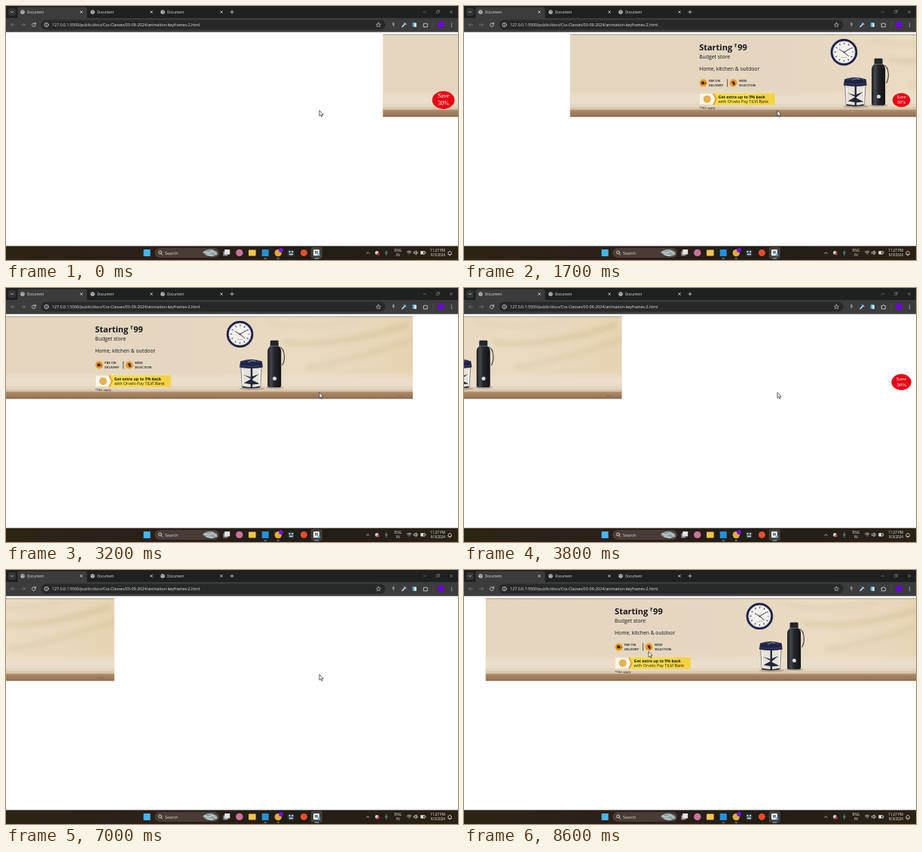
An HTML page that plays this animation: 600 px wide and 338 px high, repeating every 8700 ms.

```html
<!DOCTYPE html>
<html lang="en">
<head>
<meta charset="utf-8">
<title>Document</title>
<style>
  html, body { margin: 0; width: 100%; height: 100%; overflow: hidden; background: #fff; }
  svg { display: block; width: 600px; height: 338px; font-family: "Open Sans", "Noto Sans", sans-serif; }
  .line { fill: none; stroke-linecap: round; stroke-linejoin: round; }
  .bold { font-weight: 700; }
  .serif { font-family: "Liberation Serif", "Noto Serif", serif; }
</style>
</head>
<body>
<svg viewBox="0 0 600 338">
  <defs>
    <linearGradient id="wall">
      <stop offset="0" stop-color="#e3d5be"/><stop offset=".5" stop-color="#e4d6c0"/>
      <stop offset=".75" stop-color="#eadcc2"/><stop offset="1" stop-color="#e6d3b3"/>
    </linearGradient>
    <linearGradient id="shelf" x2="0" y2="1">
      <stop offset="0" stop-color="#eee3d0" stop-opacity="0"/><stop offset=".45" stop-color="#ebdfcb"/>
      <stop offset=".8" stop-color="#e8dcc8"/><stop offset="1" stop-color="#cdb799"/>
    </linearGradient>
    <linearGradient id="edge" x2="0" y2="1">
      <stop offset="0" stop-color="#b3967a"/><stop offset=".3" stop-color="#a38260"/><stop offset="1" stop-color="#967355"/>
    </linearGradient>
    <linearGradient id="steel">
      <stop offset="0" stop-color="#17181b"/><stop offset=".25" stop-color="#46484d"/>
      <stop offset=".5" stop-color="#232529"/><stop offset="1" stop-color="#111215"/>
    </linearGradient>
    <linearGradient id="taskbar">
      <stop offset="0" stop-color="#2a2414"/><stop offset=".4" stop-color="#2b1f1a"/>
      <stop offset=".65" stop-color="#211d17"/><stop offset="1" stop-color="#2a2214"/>
    </linearGradient>
    <filter id="blur"><feGaussianBlur stdDeviation="3"/></filter>
    <clipPath id="frame"><rect width="593.5" height="110"/></clipPath>
    <g id="globe">
      <circle r="2.7" fill="#c9cbcd"/>
      <path d="M-1.8-.9h1.9l.9 1-1.3 1.6M1-2l1 1.1" class="line" stroke="#46484b" stroke-width=".8"/>
    </g>
    <path id="cross" d="M-1.4-1.4 1.4 1.4M1.4-1.4-1.4 1.4" class="line" stroke-width=".75"/>
  </defs>

  <rect width="600" height="338" fill="#fefefe"/>

  <g id="banner">
    <g clip-path="url(#frame)">
      <rect width="593.5" height="110" fill="url(#wall)"/>
      <g filter="url(#blur)" class="line" stroke="#c9ad82" opacity=".4">
        <path d="M425 34Q490 42 585 12" stroke-width="5"/>
        <path d="M455 68Q520 58 600 28" stroke-width="6" opacity=".6"/>
        <path d="M400 8Q460 20 520 4" stroke-width="4" opacity=".5"/>
      </g>
      <rect y="74" width="593.5" height="27" fill="url(#shelf)"/>
      <path d="M0 94.5h593.5M0 97.5h593.5" stroke="#d6c4aa" stroke-width=".7"/>
      <rect y="100.5" width="593.5" height="9.5" fill="url(#edge)"/>
      <path d="M0 .4h593.5" stroke="#84735c" stroke-width=".9"/>
      <path d="M0 109.6h593.5" stroke="#664c36" stroke-width=".9"/>
      <text x="571" y="107.6" font-size="3" fill="#755a43">*terms</text>
    </g>

    <g fill="#15161a">
      <text x="171.5" y="21.5" font-size="11" class="bold">Starting</text>
      <text x="218.2" y="17" font-size="6.5" class="bold">₹</text>
      <text x="222.5" y="21.5" font-size="11" class="bold">99</text>
      <text x="171.5" y="32" font-size="6.85">Budget store</text>
      <text x="171.5" y="48" font-size="6.8">Home, kitchen &amp; outdoor</text>
      <g font-size="4.2" font-weight="600">
        <text x="184.3" y="63.7">PAY ON</text><text x="184.3" y="69.2">DELIVERY</text>
        <text x="224.3" y="63.7">WIDE</text><text x="224.3" y="69.2">SELECTION</text>
      </g>
      <path d="M209 60v10" stroke="#37332e" stroke-width=".8"/>
      <text x="171.8" y="99.4" font-size="4">*T&amp;C apply</text>
    </g>
    <g fill="#ee981f">
      <circle cx="177" cy="65" r="5"/><circle cx="217" cy="65" r="5"/>
    </g>
    <path d="M174.5 63h4v3.8h-4zm5 1.2 1.3 1.3-1.3 1.3M214.8 63.2l3-1 1.8 4.5-2.5 1.3z" fill="#3b2a20"/>

    <g transform="translate(171.8 78.8)">
      <path d="M0 0h100.2v15.3H0z" fill="#f7dc4b"/>
      <path d="M78 0h22.2v15.3H66z" fill="#f4ce3c" opacity=".6"/>
      <path d="M0 0h19.5l4 7.5-4 7.8H0z" fill="#f0a22c"/>
      <path d="M0 0h17.5l3.5 7.5-3.5 7.8H0z" fill="#f8f5ef"/>
      <circle cx="10.3" cy="7.6" r="5" fill="#e5b24e"/>
      <text x="25.2" y="6.6" font-size="5.25" class="bold" fill="#1b1a17">Get extra up to 5% back</text>
      <text x="25.2" y="13" font-size="5.4" fill="#1b1a17">with Orvelo Pay TILVI Bank</text>
    </g>

    <g transform="translate(363.8 24)">
      <circle r="16.3" fill="#f2f1ed" stroke="#202348" stroke-width="3"/>
      <circle r="14.6" fill="none" stroke="#b4b5c3" stroke-width=".5"/>
      <circle r="11.6" fill="none" stroke="#383946" stroke-width="2.4" stroke-dasharray="1 5.074" stroke-dashoffset=".5"/>
      <path d="M0 0-6-3.6M0 0l8.5-5M0 0l6 5" class="line" stroke="#24242c" stroke-width=".9"/>
      <circle r="1" fill="#24242c"/>
      <text y="7" font-size="2.4" text-anchor="middle" fill="#555">quartz</text>
    </g>

    <ellipse cx="380" cy="96.2" rx="17" ry="2" fill="#8f7a61" opacity=".5"/>
    <ellipse cx="410" cy="95" rx="12" ry="1.6" fill="#8f7a61" opacity=".5"/>

    <path d="M365 68h27.5l-1.6 26q-12 3-24.2 0z" fill="#e7e2da" fill-opacity=".9" stroke="#6e7079" stroke-width=".8"/>
    <path d="M378 69h2.4v26H378z" fill="#26283a"/>
    <path d="m368 78 10 3 11-4-9 7zM369 89l9-5 12 6-10 1zM367 93q12 3 23 0v2q-12 2-23 0z" fill="#24273a"/>
    <path d="M367.5 72v20M390 72v20" class="line" stroke="#fff" stroke-width="1"/>
    <path d="M364.5 60q14-5 28.5 0l1.2 8q-15 3-31 0z" fill="#202444"/>
    <path d="M367 60.8q12-3 23 0M364.5 66q14 2 28 0" class="line" stroke="#4b507a" stroke-width=".7"/>
    <path d="m375 61 5-2 4 1" class="line" stroke="#a8abc0" stroke-width=".8"/>

    <path d="M416 41q6 1 6.7 12 .2 7-2.5 12" class="line" stroke="#34353a" stroke-width="1.1"/>
    <rect x="404" y="32.3" width="11" height="8" rx="1.3" fill="#24262a"/>
    <path d="M403.8 40h11.4q3.3 3 3.3 6.5V92q0 2.7-2.7 2.7h-12.6q-2.7 0-2.7-2.7V46.5q0-3.5 3.3-6.5z" fill="url(#steel)"/>
    <path d="M404 39.8h11" stroke="#777a80" stroke-width=".7"/>
    <circle cx="409.8" cy="83" r="2.5" fill="#d7d8da"/>
  </g>

  <g id="badge">
    <ellipse rx="15.3" ry="12.3" fill="#e60414"/>
    <g class="serif" font-size="8.2" fill="#fff" text-anchor="middle">
      <text y="-3">Save</text><text y="6.6">30%</text>
    </g>
  </g>

  <path id="cursor" d="M0 0v7.4l1.7-1.5 1.2 2.6 1.2-.6-1.2-2.5h2.2z" fill="#fff" stroke="#222" stroke-width=".7"/>

  <!-- browser -->
  <rect width="600" height="17" fill="#1f2020"/>
  <path d="M12.5 17q3 0 3-3V4.5q0-3 3-3h86q3 0 3 3V14q0 3 3 3z" fill="#3c3c3c"/>
  <rect y="16" width="600" height="18.7" fill="#3c3c3c"/>
  <rect x="3" y="3" width="10" height="10" rx="3" fill="#343535"/>
  <path d="m6.6 7.4 1.5 1.5 1.5-1.5" class="line" stroke="#ddd" stroke-width=".8"/>
  <g id="tabs"></g>
  <path d="M300 5.9v4.2M297.9 8h4.2" class="line" stroke="#d5d5d5" stroke-width=".8"/>
  <g class="line" stroke="#858585" stroke-width=".6">
    <path d="M554 8h3.6M571.6 6.7h2.8v2.8h-2.8zM572.5 6v-.3h2.8v2.8H575"/>
    <use href="#cross" x="591" y="8"/>
  </g>
  <rect x="46.5" y="18.6" width="457" height="12.8" rx="6.4" fill="#282828"/>
  <g class="line" stroke-width=".8">
    <path d="M11.5 25H6.7m2-2-2 2 2 2M20.6 25h4.8m-2-2 2 2-2 2" stroke="#777"/>
    <path d="M39 23.7a2.4 2.4 0 1 0 .3 2M39.4 22.3v1.8h-1.8" stroke="#ddd"/>
    <circle cx="53.6" cy="25" r="2.7" stroke="#ddd"/>
    <path d="M53.6 25v1.3M53.6 23.6v.1" stroke="#ddd"/>
    <path d="m494.4 22.1.9 2 2.1.2-1.6 1.4.5 2.1-1.9-1.1-1.9 1.1.5-2.1-1.6-1.4 2.1-.2z" stroke="#ddd" stroke-width=".6"/>
    <path d="m526 27.5 3.4-3.6" stroke="#dfe8ee" stroke-width="1.5"/>
    <path d="m529 23 1.5 1.3" stroke="#6db7e8" stroke-width="2"/>
    <path d="M554.6 23.5h1.5q.9-2.2 1.8 0h1.3v1.5q2 .9 0 1.8v1.1h-4.6z" stroke="#ddd"/>
    <path d="M567 21v8" stroke="#5a5a5a" stroke-width=".6"/>
  </g>
  <path d="M513 22h2.6v4H513zM514 26h.7v2h-.7z" fill="#888"/>
  <rect x="539.7" y="22" width="5" height="5.8" rx=".8" fill="#56b8d8"/>
  <rect x="542.2" y="23" width="2.5" height="4.8" fill="#e3edf0"/>
  <circle cx="577.3" cy="24.8" r="4.4" fill="#6b06d6"/>
  <path d="M591.5 22.7v.1M591.5 24.9v.1M591.5 27.1v.1" class="line" stroke="#ddd" stroke-width="1.1"/>
  <text x="61.3" y="26.9" font-size="5.25" fill="#e6e6e6">127.0.0.1:5500/public/docs/Css-Classes/03-09-2024/animation-keyframes-2.html</text>

  <!-- taskbar -->
  <rect y="319.4" width="600" height="18.6" fill="url(#taskbar)"/>
  <rect x="182.6" y="324" width="9" height="9" fill="#45b7ef"/>
  <rect x="197.3" y="322" width="86" height="13" rx="6.5" fill="#493c37"/>
  <circle cx="204.5" cy="327.8" r="2" class="line" stroke="#eee" stroke-width=".8"/>
  <path d="m206 329.5 1.5 1.6" class="line" stroke="#eee" stroke-width=".8"/>
  <text x="211" y="330.7" font-size="5.5" fill="#ddd">Search</text>
  <path d="M261 328q5-5 13-4l6 3 1 4-6 2q-8 1-14-5z" fill="#8fa3a6"/>
  <path d="m263 327 6 2 5-3 5 4M266 331l8 1" class="line" stroke="#e5e4da" stroke-width="1"/>
  <path d="M288.3 326.5h6v6h-6z" fill="#8d8d8d"/><path d="M290.2 324h7v6.5h-7z" fill="#e4e4e4"/>
  <circle cx="309.8" cy="328.4" r="4.7" fill="#c9739a"/>
  <rect x="322" y="324.4" width="9.6" height="8.2" rx=".8" fill="#f3c648"/>
  <rect x="339.7" y="324" width="9" height="9" fill="#2491d8"/>
  <circle cx="361.3" cy="328.6" r="4.7" fill="#e2ad38"/>
  <circle cx="365" cy="325" r="2.9" fill="#7410dc"/>
  <rect x="374" y="324.2" width="8.7" height="8.7" rx="2" fill="#303942"/>
  <path d="M375.5 326h2v2h-2zm3.6 0h2v2h-2zM376 329.5h5v1.8h-5z" fill="#ccd5dc"/>
  <circle cx="395.4" cy="328.4" r="4.5" fill="#ed4c2b"/>
  <rect x="404.8" y="320.8" width="15" height="15.3" rx="2" fill="#463e37"/>
  <rect x="408" y="324" width="8" height="8.2" rx="1" fill="#e7edf2"/>
  <path d="M410 326h4v3.5h-4z" fill="#718595"/><circle cx="415.5" cy="331" r="1.7" fill="#4eabe5"/>
  <g class="line" stroke-width="1">
    <path d="M343 336h2.5M360 336h2.5" stroke="#a8a8a8"/><path d="M410 336h5" stroke="#82cbea"/>
  </g>
  <g class="line" stroke="#e2e2e2" stroke-width=".8">
    <path d="m478.7 329.4 1.7-1.7 1.7 1.7"/>
    <path d="M504.8 325.5v2.7M503.2 328q1.6 3 3.2 0M504.8 329.6v1.7" stroke="#7db8d8"/>
    <path d="M532.5 327q2.7-2.2 5.4 0M533.5 328.5q1.7-1.4 3.4 0M535.2 330.2v.1"/>
    <path d="M541.7 327.3h1.2l1.6-1.5v5l-1.6-1.5h-1.2zM546 327q1 1.3 0 2.6"/>
    <path d="M551 326.6h5v3.5h-5zM557 328v.7"/>
    <path d="M587 330.4v-2.7q2.1-3 4.2 0v2.7zM588.5 331.6h1.2"/>
  </g>
  <path d="M551 326.6h3v3.5h-3z" fill="#e2e2e2"/>
  <circle cx="492.3" cy="328.5" r="2.4" fill="#d9d9d9"/><circle cx="494" cy="330" r="1.7" fill="#d53145"/>
  <g font-size="4.6" fill="#eee">
    <g text-anchor="middle"><text x="520.3" y="327">ENG</text><text x="520.3" y="333.2">IN</text></g>
    <g text-anchor="end"><text x="583" y="327">11:27 PM</text><text x="583" y="333.2">9/3/2024</text></g>
  </g>
</svg>

<script>
const LOOP = 8700, STEP = 100;
const byId = id => document.getElementById(id);
const mix = (a, b, k) => a + (b - a) * k;
const clamp = v => Math.min(1, Math.max(0, v));

byId("tabs").innerHTML = [22, 115, 208].map(x => `
  <use href="#globe" x="${x}" y="8"/>
  <text x="${x + 6}" y="9.7" font-size="4.55" fill="#e3e3e3">Document</text>
  <use href="#cross" x="${x + 78}" y="8" stroke="#e3e3e3"/>`).join("");

// CSS "ease": cubic-bezier(.25, .1, .25, 1)
function ease(p) {
  let low = 0, high = 1;
  for (let i = 0; i < 24; i++) {
    const u = (low + high) / 2;
    if (.75 * u * (1 - u) + u ** 3 < p) low = u; else high = u;
  }
  const u = low, v = 1 - u;
  return .3 * u * v * v + 3 * u * u * v + u ** 3;
}

// Slides in from the right, lingers at the centre, leaves left, then reverses.
function bannerX(t) {
  const start = 465, leg = 2505, reach = 675;
  let d = Math.abs(t - start);
  if (d > 2 * leg) d = 4 * leg - d;
  return 2.5 + reach * (d < leg ? 1 - ease(d / leg) : -ease((d - leg) / leg));
}

// Two-second pulse: a slow pop, a quick collapse, then a pause.
function badgeScale(t) {
  const d = (t + 2000 - 1235) % 2000;
  return d < 1000 ? ease(d / 1000) : 1 - ease(clamp((d - 1000) / 240));
}

const cursorPath = [[7100, 416, 139], [7600, 344, 118.5], [8600, 245, 108.5]];
function cursorAt(t) {
  const i = t < cursorPath[1][0] ? 0 : 1;
  const [t0, x0, y0] = cursorPath[i], [t1, x1, y1] = cursorPath[i + 1];
  const k = clamp((t - t0) / (t1 - t0));
  return `${mix(x0, x1, k)} ${mix(y0, y1, k)}`;
}

function draw(now) {
  const t = Math.floor(now % LOOP / STEP) * STEP;
  byId("banner").setAttribute("transform", `translate(${bannerX(t)} 37.5)`);
  byId("badge").setAttribute("transform", `translate(580.6 125.2) scale(${badgeScale(t)})`);
  byId("cursor").setAttribute("transform", `translate(${cursorAt(t)})`);
}

const begin = performance.now();
function tick() {
  draw(performance.now() - begin);
  requestAnimationFrame(tick);
}
tick();
</script>
</body>
</html>
```
